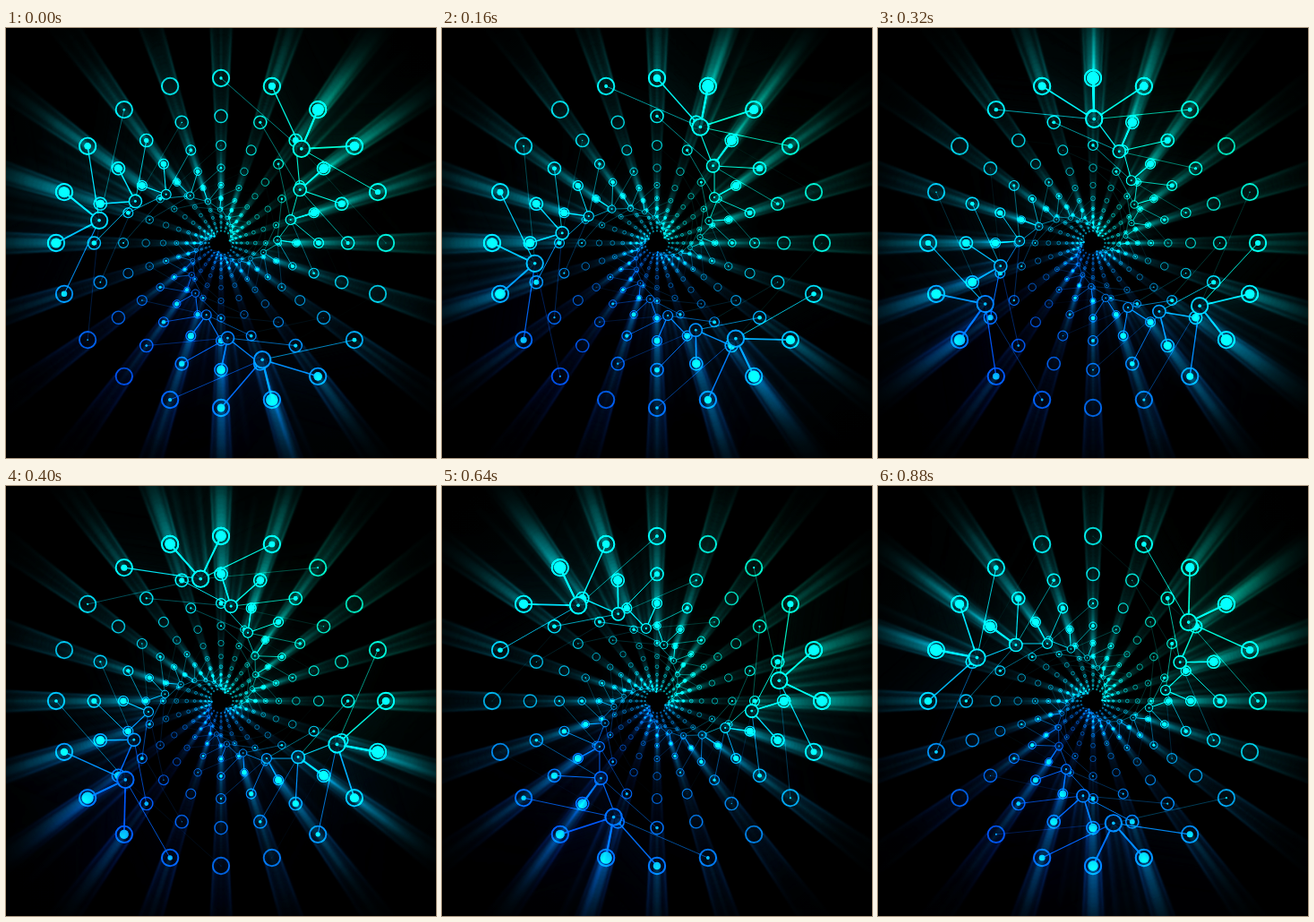
These frames come from a looping animation (480x480 px, 0.96 s). An HTML page with a canvas:

```html
<!DOCTYPE html>
<html lang="en">
<head>
<meta charset="utf-8">
<title>Node tunnel</title>
<style>
  html, body { margin: 0; width: 100%; height: 100%; overflow: hidden; background: #000; }
  canvas { display: block; width: 480px; height: 480px; }
</style>
</head>
<body>
<canvas id="stage" width="480" height="480"></canvas>
<script>
const SIZE = 480, MID = SIZE / 2, TAU = Math.PI * 2, DEG = Math.PI / 180;
const STEP_MS = 80, STEPS = 12;
const RINGS = 11, SHRINK = 0.7695, OUTER = 184, SPOKES = 20;
const HUBS = 3, HUB_START = -49.5, HUB_TWIST = 15.5, HUB_RADIUS = 0.751;
const REACH = 53;

// Hue around the circle, every 45 degrees, starting at the left.
const HUES = [194, 184, 179, 168, 175, 204, 213, 220];

const stage = document.getElementById('stage').getContext('2d');
const net = makeLayer();
let blurA = makeLayer(), blurB = makeLayer();

function makeLayer() {
  const canvas = document.createElement('canvas');
  canvas.width = canvas.height = SIZE;
  return canvas.getContext('2d');
}

const wrap = deg => ((deg % 360) + 360) % 360;
const gap = (a, b) => Math.abs(wrap(a - b + 180) - 180);

function polar(deg, radius) {
  return [MID + radius * Math.cos(deg * DEG), MID + radius * Math.sin(deg * DEG)];
}

function hueAt(deg, scale) {
  const pos = wrap(deg + 180) / 45, i = Math.floor(pos);
  const hue = HUES[i] + (HUES[(i + 1) % 8] - HUES[i]) * (pos - i);
  return 197 + (hue - 197) * (0.45 + 0.55 * Math.sqrt(scale));
}

const ringColor = (hue, alpha = 1) => `hsla(${hue}, 100%, 50%, ${alpha})`;
const dotColor = hue => `hsl(${180 + (hue - 180) * 0.6}, 100%, 51%)`;

function circle(ctx, [x, y], radius, fill, stroke, width) {
  ctx.beginPath();
  ctx.arc(x, y, radius, 0, TAU);
  if (fill) {
    ctx.fillStyle = fill;
    ctx.fill();
  }
  if (stroke) {
    ctx.strokeStyle = stroke;
    ctx.lineWidth = width;
    ctx.stroke();
  }
}

function drawRing(ctx, level, step) {
  const scale = SHRINK ** level, radius = OUTER * scale;
  const hubs = Array.from({ length: HUBS }, (_, i) =>
    HUB_START + HUB_TWIST * level - step * 10 + i * 120);
  const stroke = Math.max(0.6, 1.9 * scale);

  for (let i = 0; i < SPOKES; i++) {
    const deg = i * 360 / SPOKES, node = polar(deg, radius);
    const hue = hueAt(deg, scale);
    let near = 0;
    for (const hub of hubs) {
      const pull = 1 - gap(deg, hub) / REACH;
      near = Math.max(near, pull);
      if (pull <= 0) continue;
      ctx.beginPath();
      ctx.moveTo(...polar(hub, radius * HUB_RADIUS));
      ctx.lineTo(...node);
      ctx.strokeStyle = ringColor(hue, 0.9);
      ctx.lineWidth = 2.3 * pull * Math.max(scale, 0.3);
      ctx.stroke();
    }
    circle(ctx, node, 9.2 * scale, null, ringColor(hue, 0.75 + 0.25 * near), stroke);
    if (near > 0) circle(ctx, node, 7 * near * scale, dotColor(hue));
  }

  for (const hub of hubs) {
    const at = polar(hub, radius * HUB_RADIUS), hue = hueAt(hub, scale);
    circle(ctx, at, 9.2 * scale, 'rgba(0, 4, 8, 0.88)', ringColor(hue), stroke);
    circle(ctx, at, 1.8 * scale, dotColor(hue));
  }
}

function drawNet(step) {
  net.fillStyle = '#000';
  net.fillRect(0, 0, SIZE, SIZE);
  for (let level = RINGS - 1; level >= 0; level--) drawRing(net, level, step);
}

// Outward zoom blur with exponential falloff, doubling its length each pass.
function blurOutward() {
  blurA.globalAlpha = 1;
  blurA.drawImage(net.canvas, 0, 0);
  for (let span = 1; span <= 64; span *= 2) {
    const size = SIZE * 1.006 ** span, weight = Math.exp(-span / 48);
    blurB.globalAlpha = 1;
    blurB.drawImage(blurA.canvas, 0, 0);
    blurB.globalAlpha = weight / (1 + weight);
    blurB.drawImage(blurA.canvas, MID - size / 2, MID - size / 2, size, size);
    [blurA, blurB] = [blurB, blurA];
  }
  const fade = blurA.createRadialGradient(MID, MID, 225, MID, MID, 315);
  fade.addColorStop(0, 'rgba(0, 0, 0, 0)');
  fade.addColorStop(1, '#000');
  blurA.globalAlpha = 1;
  blurA.fillStyle = fade;
  blurA.fillRect(0, 0, SIZE, SIZE);
}

function render(step) {
  drawNet(step);
  blurOutward();
  stage.globalCompositeOperation = 'source-over';
  stage.globalAlpha = 1;
  stage.drawImage(net.canvas, 0, 0);
  stage.globalCompositeOperation = 'lighter';
  stage.drawImage(blurA.canvas, 0, 0);
  stage.globalAlpha = 0.45;
  stage.drawImage(blurA.canvas, 0, 0);
}

const start = performance.now();
let shown = -1;

function tick() {
  const step = Math.floor((performance.now() - start) / STEP_MS) % STEPS;
  if (step !== shown) render(shown = step);
  requestAnimationFrame(tick);
}
tick();
</script>
</body>
</html>
```
